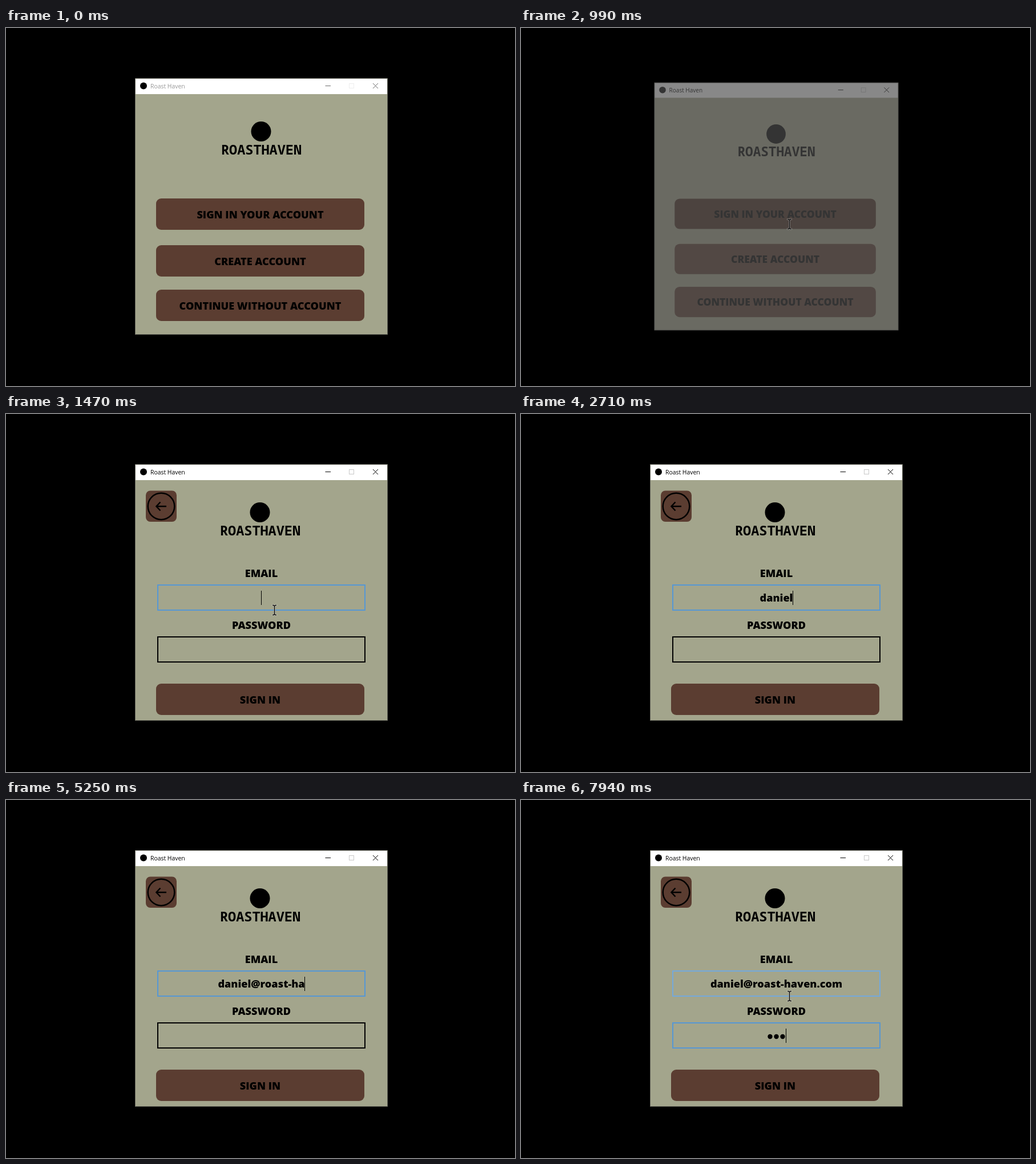
Write an HTML page that moves like this. It is 892 px wide and 628 px high and loops after 8000 ms.

```html
<!DOCTYPE html>
<html lang="en">
<head>
<meta charset="utf-8">
<title>Roast Haven</title>
<style>
  html, body { margin: 0; width: 100%; height: 100%; overflow: hidden; background: #000; }
  svg { display: block; }
  text { font: 800 18.1px "Open Sans", "Noto Sans", sans-serif; text-anchor: middle; }
  .caption { font-weight: 400; font-size: 10.4px; text-anchor: start; }
  .wordmark { font: 600 23.5px "Noto Sans Mono", "DejaVu Sans Mono", monospace; }
  .btn { fill: #5b3d31; }
  .btn.hover { fill: #492e22; }
  .line { fill: none; stroke: #000; }
  .field { fill: none; stroke: #000; stroke-width: 2; }
  .field.hover { stroke: #74a9dc; }
  .field.focus { stroke: #5697d4; }
  .max { fill: none; stroke: #c9c9c9; }
  .inactive .caption { fill: #989898; }
  .inactive .controls { stroke: #6c6c6c; }
  .inactive .max { stroke: #eee; }
</style>
</head>
<body>
<svg width="892" height="628" viewBox="0 0 892 628">
  <defs>
    <g id="frame">
      <rect x="226" y="88" width="443" height="450" fill="#6a6b60"/>
      <rect x="227" y="89" width="441" height="27" fill="#fff"/>
      <rect x="227" y="116" width="441" height="421" fill="#a3a58c"/>
    </g>
    <g id="logo">
      <circle cx="447" cy="181.500" r="17.500"/>
      <text class="wordmark" x="447.500" y="221.500">ROASTHAVEN</text>
    </g>
  </defs>

  <g id="home">
    <rect x="226" y="88" width="443" height="450" fill="#4e4e4e"/>
    <g id="homeBody">
      <use href="#frame"/>
      <g class="bar"></g>
      <use href="#logo"/>
      <rect class="btn" x="263" y="299" width="365" height="55" rx="9"/>
      <rect class="btn" x="263" y="381" width="365" height="55" rx="9"/>
      <rect class="btn" x="263" y="459" width="365" height="55" rx="9"/>
      <text x="445.500" y="333.500">SIGN IN YOUR ACCOUNT</text>
      <text x="445.500" y="415.500">CREATE ACCOUNT</text>
      <text x="445.500" y="493.500">CONTINUE WITHOUT ACCOUNT</text>
    </g>
  </g>

  <g id="login">
    <use href="#frame"/>
    <g class="bar"></g>
    <rect class="btn" x="245" y="134.500" width="54" height="54.500" rx="8"/>
    <circle class="line" cx="272" cy="162" r="23.300" stroke-width="2.500"/>
    <path class="line" d="M281 162H264M270.500 154.500L263.500 162L270.500 169.500" stroke-width="2.500"/>
    <use href="#logo" x="-2" y="-9"/>
    <text x="447.500" y="285.500">EMAIL</text>
    <rect id="email" class="field" x="266" y="300" width="363" height="44"/>
    <text id="typed" x="447.500" y="329"></text>
    <text x="447.500" y="376.500">PASSWORD</text>
    <rect id="password" class="field" x="266" y="391" width="363" height="44"/>
    <g id="dots">
      <circle r="4.200" cy="415"/>
      <circle r="4.200" cy="415"/>
      <circle r="4.200" cy="415"/>
    </g>
    <rect id="caret" width="1" height="25"/>
    <rect class="btn" x="263" y="473" width="365" height="55" rx="9"/>
    <text x="445.500" y="508">SIGN IN</text>
  </g>

  <path id="arrow" d="M.5 .5V17L4.300 13.500L6.800 19.200L9.300 18.100L6.900 12.500H12Z" fill="#fff" stroke="#000"/>
  <g id="beam" fill="none">
    <path id="beamShape" d="M466.500 335.500H469L470.500 337L472 335.500H474.500M470.500 337V351M466.500 352.500H469L470.500 351L472 352.500H474.500" stroke="#fff" stroke-width="2.600" stroke-opacity=".6"/>
    <use href="#beamShape" class="core"/>
    <path d="M467 335.500H469L470.500 337L472 335.500H474M470.500 336V352M467 352.500H469L470.500 351L472 352.500H474" stroke="#000" stroke-width="1.500"/>
  </g>
</svg>
<script>
  const LOOP = 8000;
  const ADDRESS = "daniel@roast-haven.com";
  const KEYS = [1940, 2090, 2320, 2470, 2550, 2710, 3180, 3660, 3730, 3900, 4060,
                4520, 4750, 4990, 5250, 5460, 5600, 5770, 5920, 6160, 6310, 6390];
  const DOT_KEYS = [7490, 7790, 7940];
  const MOVE = 210, STEP = 78, OPEN = 1080, FOCUS = 1390, TAB = 6560;

  const $ = id => document.getElementById(id);
  const show = (el, on) => el.setAttribute("display", on ? "inline" : "none");
  const typedBy = (keys, t) => keys.filter(k => k <= t).length;
  const lerp = (a, b, p) => a + (b - a) * p;

  const home = $("home"), login = $("login"), typed = $("typed"), caret = $("caret");
  const buttons = [...document.querySelectorAll("#homeBody .btn")];
  const dots = [...$("dots").children];
  document.querySelector("#beam .core").remove();

  for (const bar of document.querySelectorAll(".bar")) {
    bar.innerHTML = `
      <circle cx="241" cy="101.500" r="6"/>
      <text class="caption" x="253" y="106">Roast Haven</text>
      <path class="line controls" d="M559.500 101.500H569M643 97L652 106M652 97L643 106"/>
      <rect class="max" x="601.500" y="97.500" width="8" height="8"/>`;
  }

  function zoom(el, scale) {
    el.setAttribute("transform", `translate(447 313) scale(${scale}) translate(-447 -313)`);
  }

  function drawHome(t) {
    show(home, t < OPEN);
    if (t >= OPEN) return;
    const step = Math.floor((t - MOVE) / STEP);
    const p = Math.min(1, Math.max(0, step / 7));
    const ease = p * p * (3 - 2 * p);
    const x = lerp(724, 470, ease), y = lerp(588, 344, ease);
    $("arrow").setAttribute("transform", `translate(${Math.round(x)} ${Math.round(y)})`);

    for (const b of buttons) {
      const { x: bx, y: by, width, height } = b.getBBox();
      const inside = x > bx && x < bx + width && y > by && y < by + height;
      b.classList.toggle("hover", step >= 0 && inside);
    }
    home.classList.toggle("inactive", step < 8);
    zoom(home, step < 9 ? 1 : step < 10 ? 0.985 : 0.966);
    $("homeBody").setAttribute("opacity", step < 9 ? 1 : step < 10 ? 0.75 : 0.33);
  }

  function drawLogin(t) {
    show(login, t >= OPEN);
    if (t < OPEN) return;
    zoom(login, t < 1160 ? 0.972 : t < 1230 ? 0.993 : 1);
    login.setAttribute("opacity", t < 1160 ? 0.5 : t < 1230 ? 0.88 : 1);

    const onEmail = t >= FOCUS && t < TAB, onPassword = t >= TAB;
    const hovered = t < KEYS[0] || t >= 6480;
    $("email").classList.toggle("focus", onEmail);
    $("email").classList.toggle("hover", hovered && !onEmail);
    $("password").classList.toggle("focus", onPassword);

    typed.textContent = ADDRESS.slice(0, typedBy(KEYS, t));
    const count = typedBy(DOT_KEYS, t);
    const left = 448 - 5.5 * count;
    dots.forEach((d, i) => {
      d.setAttribute("cx", left + 5 + 11 * i);
      show(d, i < count);
    });

    const end = typed.textContent ? 447.5 + typed.getComputedTextLength() / 2 : 447;
    const blinkedOff = t >= 7180 && t < DOT_KEYS[0];
    caret.setAttribute("x", Math.floor(onPassword ? left + 11 * count - (count ? 0.5 : 1) : end));
    caret.setAttribute("y", onPassword ? 401 : 310);
    show(caret, t >= 1470 && !blinkedOff);
  }

  function draw(t) {
    drawHome(t);
    drawLogin(t);
    show($("arrow"), t >= MOVE && t < 990);
    show($("beam"), (t >= 990 && t < KEYS[0]) || t >= 6480);
  }

  const start = performance.now();
  function tick() {
    draw((performance.now() - start) % LOOP);
    requestAnimationFrame(tick);
  }
  tick();
</script>
</body>
</html>
```
